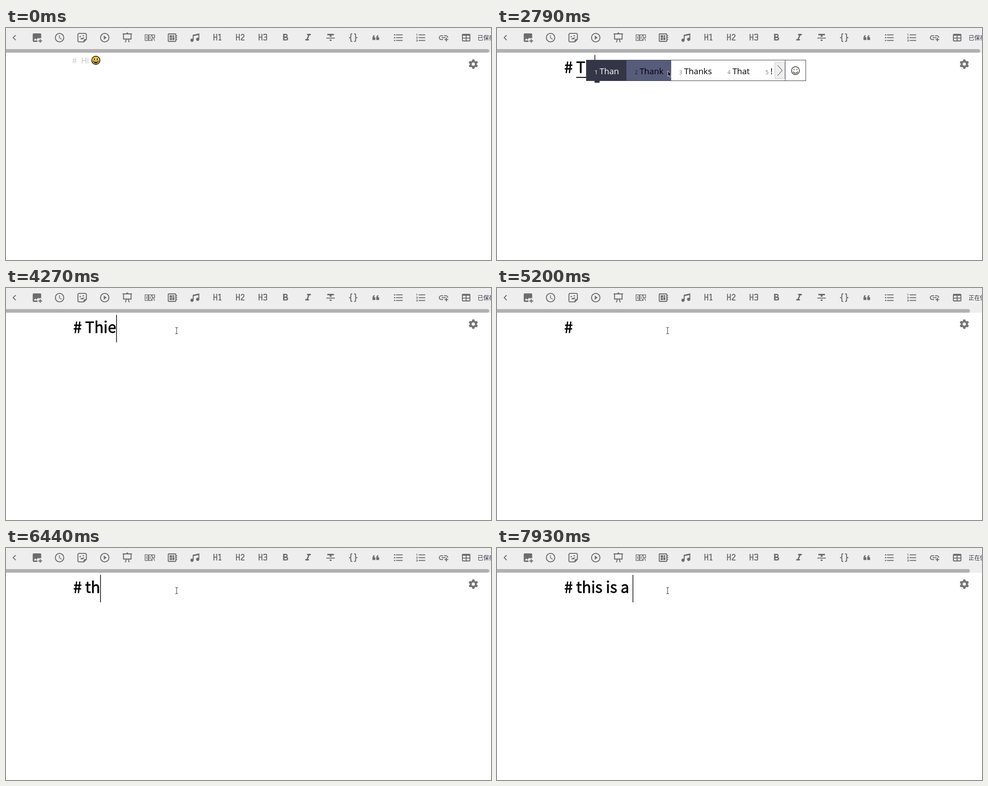
An HTML page that plays this animation: 1083x517 px, repeating every 8000 ms.

```html
<!DOCTYPE html>
<html lang="zh-CN">
<head>
<meta charset="utf-8">
<title>Markdown editor</title>
<style>
  html, body { margin: 0; width: 100%; height: 100%; overflow: hidden; background: #fff; }
  svg { position: absolute; left: 0; top: 0; }
  text { white-space: pre; }
  #icons { fill: #6d6d6d; fill-rule: evenodd; }
  #icons .line { fill: none; stroke: #6d6d6d; }
  #status { font: 12.7px "Noto Sans CJK SC", "Noto Sans CJK", sans-serif; fill: #33334a; }
  #hint text { font: 18px "Liberation Sans", Arial, sans-serif; fill: #c6c6c6; }
  #line { font: 400 34px "Noto Sans CJK SC", "Noto Sans CJK", sans-serif; font-kerning: none;
    stroke: #000; stroke-width: .8px; }
  #popup { position: absolute; left: 199px; top: 71px; height: 45px; display: flex;
    border: 1px solid #35374a; background: #fff; white-space: nowrap;
    font: 18.6px/47px "Open Sans", "Noto Sans", sans-serif; color: #000; }
  .word { padding: 0 17px 0 18px; }
  .word i { display: inline-block; width: 11px; font-size: 12px; font-style: normal; color: #777; }
  .word:first-child, .word:first-child i { background: #343648; color: #fff; }
  .word.hover { background: #585c7b; }
  .word.hover i { color: #222; }
  .word.last { padding-right: 5px; }
  .more { box-sizing: border-box; width: 23px; height: 37px; margin-top: 4px;
    background: #eee; border: 1px solid #ccc; }
  .face { width: 45px; border-left: 1px solid #35374a; }
  .more svg, .face svg { position: static; display: block; fill: none; stroke: #222; }
</style>
</head>
<body>
<svg width="1083" height="517" viewBox="0 0 1083 517">
  <rect width="1083" height="55" fill="#eee"/>
  <g id="icons"></g>
  <text id="status" x="1053" y="26"></text>
  <rect id="thumb" x="-8" y="47" height="8" rx="4" fill="#b1b1b1"/>
  <g id="gear" transform="translate(1043.5 80.5) scale(1.05)" fill="#757575">
    <circle r="5.4" fill="none" stroke="#757575" stroke-width="3.8"/>
  </g>
  <g id="hint">
    <text x="148" y="78.5">#&#160; Hi</text>
    <g transform="translate(200.6 72)">
      <circle r="9.2" fill="#ffc83d" stroke="#111" stroke-width="1.7"/>
      <ellipse cx="-3.2" cy="-2.6" rx="1.2" ry="1.7"/>
      <ellipse cx="3.2" cy="-2.6" rx="1.2" ry="1.7"/>
      <path d="M-6 1H6A6 5.8 0 0 1-6 1Z"/>
      <path d="M-4.6 1.8H4.6L4 3.6H-4Z" fill="#fff"/>
    </g>
  </g>
  <text id="line" x="150.3" y="99.5"></text>
  <rect id="underline" x="177" y="109" height="2.2"/>
  <rect id="caret" width="1.5"/>
</svg>
<div id="popup"></div>
<svg width="1083" height="517" viewBox="0 0 1083 517">
  <g id="pointer">
    <path id="beam" d="M-3-7H-1L0-6 1-7H3M0-6V6M-3 7H-1L0 6 1 7H3" fill="none" stroke="#222"/>
    <path id="arrow" d="M.5.5V13L3.4 10.3 5.6 15.2 7.8 14.2 5.7 9.4H9.3Z" fill="#111" stroke="#fff" stroke-width=".8"/>
  </g>
</svg>
<script>
const LOOP = 8000;
const $ = id => document.getElementById(id);
const show = (id, on) => { $(id).style.display = on ? '' : 'none'; };
const setAttrs = (id, attrs) => {
  for (const [name, value] of Object.entries(attrs)) $(id).setAttribute(name, value);
};

// Toolbar: each icon sits in a 24-unit box; lines(width, path) gives an outlined icon.
const fill = d => `<path d="${d}"/>`;
const lines = (width, d) => `<path class="line" stroke-width="${width}" d="${d}"/>`;
const ring = '<circle class="line" cx="12" cy="12" r="9" stroke-width="2"/>';
const header = d => fill('M3 4H5V10H9V4H11V18H9V12H5V18H3Z' + d);
const bullets = [6, 12, 18].map(y => `<circle cx="4" cy="${y}" r="1.5"/>`).join('');
const rows = lines(2, 'M7 6H21M7 12H21M7 18H21');

const icons = [
  fill('M15.4 16.6 10.8 12 15.4 7.4 14 6 8 12 14 18Z'),
  fill('M18 15V18H15V20H18V23H20V20H23V18H20V15ZM13.3 21H5A2 2 0 0 1 3 19V5A2 2 0 0 1 5 3H19A2 2 0 0 1 21 5V13.3A6 6 0 0 0 15.9 13.9L14.5 12 11 16.5 8.5 13.5 5 18H13.1A6 6 0 0 0 13.3 21Z'),
  ring + lines(1.5, 'M11.75 7V12.6L16.6 15.5'),
  lines(2, 'M5.5 3H18.5A2.5 2.5 0 0 1 21 5.5V15.6L15.6 21H5.5A2.5 2.5 0 0 1 3 18.5V5.5A2.5 2.5 0 0 1 5.5 3ZM16 21V18.5A2.5 2.5 0 0 1 18.5 16H21') +
    fill('M12.9 9.4A1.75 1.75 0 1 1 16.2 8.6ZM6.7 11.2A1.75 1.75 0 1 1 9.9 10.3ZM16.7 11.3 7.6 13.8A5.3 5.3 0 0 0 16.7 11.3Z'),
  ring + fill('M10 16.5 16 12 10 7.5Z'),
  fill('M2 3H10A2 2 0 0 1 14 3H22V5H21V16H15.25L17 22H15L13.25 16H10.75L9 22H7L8.75 16H3V5H2ZM5 5V14H19V5Z'),
  lines(1.4, 'M1.7 6H8V18H1.7ZM4.9 9V15M15.2 9V6H9.6V18H15.2V15M12.5 9V15M16.8 18.6V6H22V12H17M19 12 22.2 18.6'),
  fill('M22 9V7H20V5A2 2 0 0 0 18 3H4A2 2 0 0 0 2 5V19A2 2 0 0 0 4 21H18A2 2 0 0 0 20 19V17H22V15H20V13H22V11H20V9ZM18 19H4V5H18ZM6 13H11V17H6ZM12 7H16V10H12ZM6 7H11V12H6ZM12 11H16V17H12Z'),
  fill('M21 3V15.5A3.5 3.5 0 1 1 19 12.3V6.5L9 8.6V17.5A3.5 3.5 0 1 1 7 14.3V6Z'),
  header('M14 18V16H16V6.3L13.5 7.75V5.4L16 4H18V16H20V18Z'),
  header('M21 18H15A2 2 0 0 1 13.5 14.6L18.4 9.4A2 2 0 1 0 15 8H13A4 4 0 1 1 19.8 10.8L15 16H21Z'),
  header('M15 4H19A2 2 0 0 1 21 6V16A2 2 0 0 1 19 18H15A2 2 0 0 1 13 16V15H15V16H19V12H15V10H19V6H15V7H13V6A2 2 0 0 1 15 4Z'),
  fill('M13.5 15.5H10V12.5H13.5A1.5 1.5 0 0 1 13.5 15.5ZM10 6.5H13A1.5 1.5 0 0 1 13 9.5H10ZM15.6 10.8A4 4 0 0 0 13.25 4H7V18H14A3.8 3.8 0 0 0 15.6 10.8Z'),
  fill('M10 4V7H12.2L8.8 15H6V18H14V15H11.8L15.2 7H18V4Z'),
  fill('M3 14H21V12H3ZM5 4V7H10V10H14V7H19V4ZM10 19H14V16H10Z'),
  lines(2, 'M10 4H8.5A1.5 1.5 0 0 0 7 5.5V9.5A2.5 2.5 0 0 1 4.5 12H3 4.5A2.5 2.5 0 0 1 7 14.5V18.5A1.5 1.5 0 0 0 8.5 20H10M14 4H15.5A1.5 1.5 0 0 1 17 5.5V9.5A2.5 2.5 0 0 0 19.5 12H21 19.5A2.5 2.5 0 0 0 17 14.5V18.5A1.5 1.5 0 0 1 15.5 20H14'),
  fill('M10 7 8 11H11V17H5V11L7 7ZM18 7 16 11H19V17H13V11L15 7Z'),
  rows + bullets,
  rows + lines(1, 'M2 4.5H3.5V8M2 10.5H4.5V11L2.5 13.5H5M2 16.5H4.5V19.5H2M3 18H4.5'),
  lines(2, 'M11 8H7A4 4 0 0 0 7 16H11M13 8H17A4 4 0 0 1 21 12M8 12H16M18 12V20M14 16H22'),
  fill('M5 4H19A2 2 0 0 1 21 6V18A2 2 0 0 1 19 20H5A2 2 0 0 1 3 18V6A2 2 0 0 1 5 4ZM5 8V12H11V8ZM13 8V12H19V8ZM5 14V18H11V14ZM13 14V18H19V14Z')
];
$('icons').innerHTML = icons.map((icon, i) =>
  `<g transform="translate(${6.1 + i * 50.44} 8.9) scale(1.05)">${icon}</g>`).join('');

for (let angle = 0; angle < 360; angle += 60) {
  $('gear').innerHTML += `<path transform="rotate(${angle})" d="M-2-10H2L3.4-6H-3.4Z"/>`;
}

// Input method suggestions for each composed string; the second one is hovered.
const suggestions = {
  T: 'The To This That !',
  Th: 'Than Thank Thanks That !',
  Thi: 'This Think Things Thin !',
  Thie: 'Thief Thieves Thin Thing !',
  Thies: 'Thies Thieves This These !'
};
const popupEnd =
  '<div class="more"><svg width="21" height="35"><path d="M5.5 6 16 17.5 5.5 29"/></svg></div>' +
  '<div class="face"><svg width="45" height="45"><g transform="translate(22.5 23)" stroke-width="1.4">' +
  '<circle r="8.8"/><path d="M-5 2A5.2 5 0 0 0 5 2"/>' +
  '<path d="M-3.2-3.6V-1.4M3.2-3.6V-1.4" stroke-width="2"/></g></svg></div>';
const popupHtml = words => words.split(' ').map((word, i, all) => {
  const extra = i === 1 ? ' hover' : i === all.length - 1 ? ' last' : '';
  return `<div class="word${extra}"><i>${i + 1}</i>${word}</div>`;
}).join('') + popupEnd;

// [time, text, flags]  c: caret, s: saving, u: composing, p: suggestions open
const steps = [
  [0, '', ''], [760, '', 'c'], [1290, '', ''],
  [1690, '#', 'c'], [1920, '# ', 'cs'],
  [2300, '# T', 'csu'], [2370, '# T', 'csup'], [2450, '# Th', 'csu'], [2530, '# Th', 'csup'],
  [2790, '# Th', 'cup'], [3020, '# Thi', 'csup'], [3180, '# Thie', 'csup'],
  [3330, '# Thies', 'csup'], [3490, '# Thies', 'cup'], [3560, '# Thies', 'c'],
  [3640, '# Thies', 'cs'], [3960, '# Thies', 'c'],
  [4100, '# Thie', 'cs'], [4270, '# Thie', 'c'], [4350, '# Thi', 'cs'], [4500, '# Th', 'cs'],
  [4650, '# Th', 'c'], [4800, '# T', 'cs'], [4970, '# T', 'c'],
  [5200, '# ', 's'], [5350, '# ', 'cs'], [5520, '# ', 'c'],
  [6050, '# t', 'cs'], [6130, '# th', 'cs'], [6440, '# th', 'c'],
  [6820, '# thi', 'cs'], [6890, '# this', 'cs'], [7050, '# this ', 'cs'], [7200, '# this i', 'cs'],
  [7350, '# this is', 'cs'], [7500, '# this is', 'c'], [7640, '# this is ', 'cs'],
  [7780, '# this is a', 'cs'], [7930, '# this is a ', 'cs']
];

function drawStep([, text, flags]) {
  const has = flag => flags.includes(flag);
  $('line').textContent = text;
  show('hint', !text);
  $('status').textContent = has('s') ? '正在保存' : '已保存';
  setAttrs('thumb', { width: has('s') ? 1064 : 1087 });

  const end = 150.3 + (text ? $('line').getComputedTextLength() : 0);
  show('caret', has('c'));
  setAttrs('caret', text ? { x: end, y: 60, height: 61 } : { x: 149.3, y: 51, height: 26 });
  show('underline', has('u'));
  setAttrs('underline', { width: Math.max(0, end - 177) });

  show('popup', has('p'));
  if (has('p')) $('popup').innerHTML = popupHtml(suggestions[text.slice(2)]);
  show('arrow', has('p'));
  show('beam', !has('p'));
}

function drawPointer(time) {
  const progress = Math.min(1, Math.max(0, Math.floor((time - 140) / 76.6) / 9));
  const rest = (1 - progress) ** 2;
  show('pointer', time >= 140);
  setAttrs('pointer', { transform: `translate(${381 + 100 * rest} ${95 + 402 * rest})` });
}

let current;
function frame() {
  const time = performance.now() % LOOP;
  const step = steps.findLast(([start]) => start <= time);
  if (step !== current) drawStep(current = step);
  drawPointer(time);
  requestAnimationFrame(frame);
}
frame();
</script>
</body>
</html>
```
